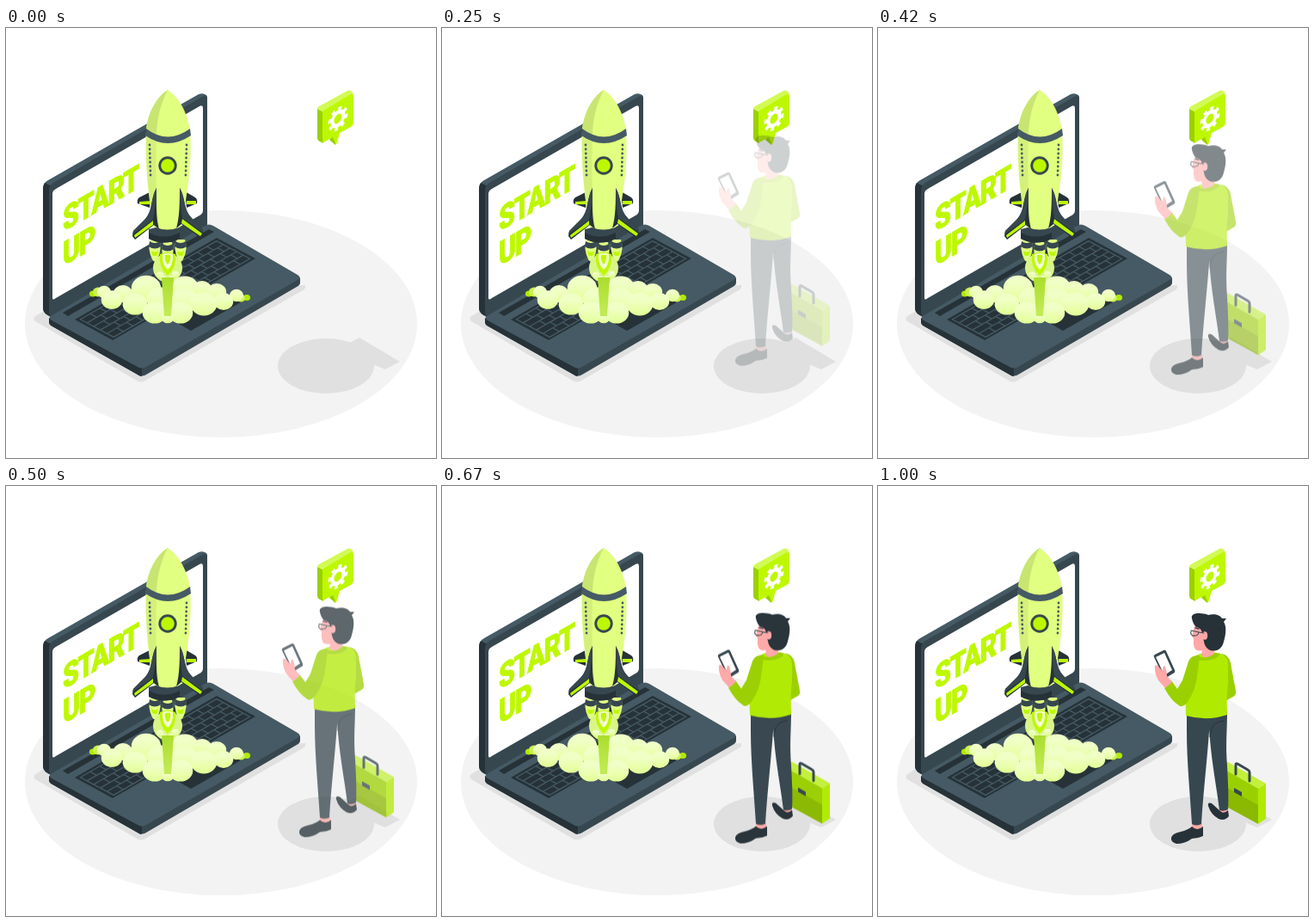
Recreate the animation shown at these times as an HTML page. Size 500 by 500 pixels, loop 1.04 s.

```html
<!DOCTYPE html>
<html lang="en">
<head>
<meta charset="utf-8">
<title>Start up</title>
<style>
  html, body { margin: 0; width: 100%; height: 100%; overflow: hidden; background: #fff; }
  svg { display: block; width: 100vw; height: 100vh; }
  .lime { fill: #b0ea00; }
  .bright { fill: #bdf800; }
  .limeMid { fill: #9bd000; }
  .limeDark { fill: #8bb800; }
  .pale { fill: #e1ff80; }
  .slate { fill: #455a64; }
  .dark { fill: #37474f; }
  .ink { fill: #263238; }
  .skin { fill: #ffa8a7; }
  .line { fill: none; stroke: #37474f; stroke-linejoin: round; stroke-linecap: round; }
  .title { font: 800 39px Roboto, Inter, Arial, sans-serif; letter-spacing: -2px; stroke: #bdf800; stroke-width: .9; }
</style>
</head>
<body>
<svg viewBox="0 0 500 500">
  <defs>
    <linearGradient id="puff" x1="0" y1="0" x2="0" y2="1">
      <stop offset=".3" stop-color="#f0ffc6"/>
      <stop offset="1" stop-color="#e3ff95"/>
    </linearGradient>
    <linearGradient id="plume" x1="0" y1="0" x2="0" y2="1">
      <stop offset="0" stop-color="#aade2c"/>
      <stop offset="1" stop-color="#c3ec58"/>
    </linearGradient>
  </defs>

  <!-- floor and shadows -->
  <ellipse cx="250" cy="344" rx="228" ry="132" fill="#f3f3f3"/>
  <g fill="#e0e0e0">
    <path d="M34 341Q31 338 34 335L60 320L348 299Q349 303 345 305L162 410Q157 413 152 410Z"/>
    <ellipse cx="372" cy="393" rx="56" ry="32"/>
    <path d="M396 368L411 360L458 388L441 397L424 390Z"/>
  </g>

  <!-- laptop screen -->
  <path class="slate" d="M43 326V187Q43 180 49 177L224 77Q229 75 233 78L234 80V231L52 336Q43 332 43 326Z"/>
  <path class="ink" d="M43 326V187Q43 183 45 180L53 184V336Q43 332 43 326Z"/>
  <path class="dark" d="M50 332V189Q50 183 55 180L228 80Q234 77 234 83V231L52 336Z"/>
  <path fill="#fff" d="M54 314V193Q54 189 58 187L225 91Q229 89 229 93V212Q229 216 225 218L58 314Q54 317 54 314Z"/>
  <g class="bright title">
    <text transform="matrix(.78 -.45 0 1 66 237)">START</text>
    <text transform="matrix(.78 -.45 0 1 66 277)">UP</text>
  </g>

  <!-- laptop base -->
  <path class="dark" d="M50 338L158 394L342 290V296Q342 299 338 301L163 403Q158 406 153 403L54 347Q50 345 50 342Z"/>
  <path class="ink" d="M50 337L158 394V405Q155 405 153 403L54 347Q50 345 50 342Z"/>
  <path class="slate" d="M52 335L231 230Q236 227 241 230L339 287Q344 290 339 293L163 394Q158 397 153 394L53 340Q49 337 52 335Z"/>
  <path class="ink" d="M66 331L236 234L242 237L72 335Z"/>
  <path class="ink" d="M80 339L245 244L290 268L124 363Z"/>
  <g id="keys" fill="none" stroke="#455a64" stroke-width="1.3"/>
  <path class="ink" d="M173 328L215 352L273 319L231 295Z"/>

  <!-- rocket -->
  <g>
    <path class="ink" d="M169 190L155 197Q152 199 153 204L167 209ZM208 190L220 197Q223 199 222 204L210 209Z"/>
    <path class="bright" d="M155 202L168 201V205L155 205ZM210 201L221 201V205L210 205Z"/>
    <g id="jets"></g>
    <path class="dark" d="M166 234Q184 228 202 234V245Q184 254 166 245Z"/>
    <path class="ink" d="M166 238Q184 247 202 238V245Q184 254 166 245Z"/>
    <path class="pale" d="M188 72C176 79 164 99 163 120C161 158 166 200 172 231Q188 238 203 231C210 200 217 158 214 120C212 99 200 79 188 72Z"/>
    <path fill="#c8e572" d="M188 72C176 79 164 99 163 120Q168 125 175 127C175 105 180 88 188 72Z"/>
    <path fill="#d4f07a" d="M163 124C162 160 167 202 172 231L178 233C174 198 174 160 175 129Z"/>
    <path class="slate" d="M163 117Q188 136 214 117L215 125Q188 143 162 125Z"/>
    <circle class="dark" cx="188" cy="160" r="10.7"/>
    <circle class="bright" cx="188" cy="160" r="7.8"/>
    <g id="rivets" class="slate"></g>
    <path class="ink" d="M175 186C168 198 171 212 162 222L148 236L147 242L150 246L172 229L178 234C174 220 175 203 175 186Z"/>
    <path class="dark" d="M175 186C168 198 171 212 162 222L148 236L147 240L171 223C173 210 175 200 175 186Z"/>
    <path class="bright" d="M149 241L171 224V229L150 244Z"/>
    <path class="ink" d="M202 186C209 198 206 210 215 220L229 235V240L226 244L204 228L198 233C202 219 202 203 202 186Z"/>
    <path class="dark" d="M202 186C209 198 206 210 215 220L229 235V238L205 221C203 209 202 200 202 186Z"/>
    <path class="bright" d="M205 222L228 239L226 242L204 227Z"/>
  </g>

  <!-- flame and smoke -->
  <circle cx="188" cy="279" r="17" fill="#d9f588"/>
  <g id="smoke"></g>
  <path class="bright" d="M179 263Q188 259 197 263Q199 278 188 288Q177 278 179 263Z"/>
  <path fill="#f5ffd8" d="M182 263Q188 261 194 263Q195 275 188 281Q181 275 182 263Z"/>
  <path class="bright" d="M185 264Q188 263 191 264Q192 271 188 275Q184 271 185 264Z"/>

  <!-- speech bubble -->
  <path class="limeMid" d="M362 94L369 97V134L365 132Q362 131 362 127ZM376 130L379 126L386 123L383 136Z"/>
  <path fill="#d2fa55" d="M362 94Q362 92 364 91L397 73Q399 72 401 73L404 76L369 98Z"/>
  <path class="bright" d="M368 99Q368 96 371 95L401 77Q404 76 404 79V110Q404 113 401 115L388 122L384 136L380 127L371 132Q368 134 368 131Z"/>
  <g transform="matrix(.866 -.5 0 1 386 105.5)" fill="none" stroke="#fff">
    <circle r="7.6" stroke-width="4.6"/>
    <circle r="11" stroke-width="4.6" stroke-dasharray="4.32 4.32"/>
  </g>

  <!-- person and briefcase -->
  <g id="person">
    <path fill="#c3f03c" d="M398 327L407 321L451 346L442 352Z"/>
    <path class="limeDark" d="M398 327L442 352V393L398 369Z"/>
    <path class="limeMid" d="M398 327L442 352V371L398 346Z"/>
    <path class="lime" d="M442 352L451 346V387L442 393Z"/>
    <path class="line" stroke-width="3" d="M416 335V324Q416 322 418 323L430 330Q432 331 432 333V343"/>
    <path class="dark" d="M414 351L423 356V361L414 356Z"/>

    <path class="skin" d="M397 374H406L407 385L398 382ZM365 391L377 392V402L365 400Z"/>
    <path class="ink" d="M384 372Q383 367 388 369L398 378Q402 382 407 377L408 384Q403 390 396 387Q387 382 384 372Z"/>
    <path class="ink" d="M341 409Q342 404 352 402Q360 400 365 396Q371 402 378 396V407Q372 410 365 410Q357 416 347 416Q340 414 341 409Z"/>
    <path class="dark" d="M383 264L406 262C406 285 404 300 406 325C407 345 408 362 407 376Q402 379 397 377C394 350 388 325 385 282Z"/>
    <path class="dark" d="M359 264L406 263Q406 268 404 272C392 274 386 278 385 286C382 325 378 360 376 393Q370 396 365 393C363 360 359 320 359 285Z"/>
    <path fill="none" stroke="#263238" d="M402 273C391 275 387 279 386 292"/>

    <path class="limeMid" d="M399 195Q408 196 410 206L416 238Q417 243 413 245L404 250Z"/>
    <path class="lime" d="M370 197Q384 190 398 195Q406 197 407 207L407 230Q405 240 406 266Q383 274 358 267Q357 245 359 225Q361 207 370 197Z"/>
    <path class="limeMid" d="M374 197Q364 196 361 204L354 226L348 236L341 226L333 235Q341 250 351 256Q356 257 360 251Q369 238 371 222Q373 208 374 197Z"/>

    <path class="dark" d="M321 199Q320 197 322 196L332 191Q334 190 335 192L345 214Q346 217 343 218L335 223Q333 224 332 222Z"/>
    <path fill="#fff" d="M323 199L333 194L342 214L333 220Z"/>
    <path class="skin" d="M322 209Q324 207 326 210L331 215Q331 207 334 210Q336 216 336 221L342 228L334 235L326 226Q321 217 322 209Z"/>

    <path class="skin" d="M378 183H391V197Q382 202 376 197Z"/>
    <path class="limeMid" d="M370 197Q382 203 392 194L398 195Q391 206 370 202Z"/>
    <path class="skin" d="M369 161Q366 168 365 175L367 177Q366 190 371 191Q378 193 384 187L388 166L378 158Z"/>
    <path class="ink" d="M365 154C363 147 376 147 384 150C391 148 398 150 400 154L405 154L402 158C406 164 404 174 402 181C400 190 393 193 386 191Q380 188 379 181L377 171Q376 165 370 164Q366 160 365 154Z"/>
    <ellipse class="skin" cx="380" cy="174" rx="3.2" ry="4.8"/>
    <path class="line" stroke-width="1.1" d="M364 169Q363 173 366 174Q372 175 373 170L364 168M373 170L379 171"/>
    <path class="line" stroke-width="1.3" d="M369 165L373 166"/>
  </g>
</svg>
<script>
  const $ = id => document.getElementById(id);

  function add(parent, tag, attrs) {
    const el = document.createElementNS('http://www.w3.org/2000/svg', tag);
    for (const k in attrs) el.setAttribute(k, attrs[k]);
    parent.append(el);
  }

  // Keyboard grid: u runs along the rows, v across them, inside a thin border.
  const inset = (x, m) => m + x * (1 - 2 * m);
  function at(u, v) {
    u = inset(u, 0.02);
    v = inset(v, 0.07);
    return `${80 + 165 * u + 45 * v} ${339 - 95 * u + 24 * v}`;
  }
  const ROWS = 5, COLS = 14;
  let grid = `M${at(0, 0)}L${at(1, 0)}L${at(1, 1)}L${at(0, 1)}Z`;
  for (let r = 0; r < ROWS; r++) {
    if (r) grid += `M${at(0, r / ROWS)}L${at(1, r / ROWS)}`;
    for (let c = 1; c < COLS; c++) {
      const u = (c + (r % 2) * 0.4) / COLS;
      grid += `M${at(u, r / ROWS)}L${at(u, (r + 1) / ROWS)}`;
    }
  }
  add($('keys'), 'path', { d: grid });

  for (let i = 0; i < 8; i++) {
    const cy = 136 + i * 5;
    add($('rivets'), 'circle', { cx: 167 + i * 0.15, cy, r: 1.4 });
    add($('rivets'), 'circle', { cx: 210 - i * 0.15, cy, r: 1.4 });
  }

  for (const x of [173, 188, 203]) {
    const y = x === 188 ? 3 : 0;
    const jet = (cls, d) => add($('jets'), 'path', { class: cls, d, transform: `translate(${x} ${y})` });
    jet('pale', 'M-5 246H5Q9 256 3 269Q0 274 -3 269Q-9 256 -5 246Z');
    jet('dark', 'M-6 248Q0 252 6 248L7 254Q0 259 -7 254Z');
    jet('bright', 'M-4 259Q0 262 4 259L3 264Q0 266 -3 264Z');
  }

  const GREEN = '#b0ea00', LIGHT = '#c9f24e', PUFF = 'url(#puff)';
  const puffs = [
    [101, 309, 4, GREEN], [107, 307, 6, LIGHT], [280, 313.5, 4, GREEN], [273, 314, 5, LIGHT],
    [114, 307, 8], [136, 309, 11], [123, 316, 12], [268, 311, 8],
    [228, 304, 11], [245, 307, 11], [163, 303, 17], [208, 303, 16],
    [180, 316, 16], [207, 317, 16],
    [150, 321, 14], [253, 318, 11], [230, 321, 15],
    [173, 331, 14], [203, 331, 14], [188, 337, 7],
    [179, 287, 4], [197, 286, 4], [183, 291, 3], [192, 291, 3]
  ];
  for (const [cx, cy, r, fill = PUFF] of puffs) {
    add($('smoke'), 'ellipse', { cx, cy, rx: r * 1.02, ry: r * 0.9, fill });
  }
  add($('smoke'), 'path', { d: 'M181 290H195L192 335H184Z', fill: 'url(#plume)' });

  // The person drops in with a slight overshoot, at 24 steps a second.
  const LOOP = 1040, STEPS = 24;
  const drop = $('person').animate(
    [{ opacity: 0, transform: 'translateY(-30px)' }, { opacity: 1, transform: 'translateY(0px)' }],
    { duration: 1000, easing: 'cubic-bezier(.36,-.01,.5,1.38)', fill: 'both' }
  );
  drop.pause();

  const stepStart = n => Math.round(n * 100 / STEPS) * 10;
  const start = performance.now();

  function draw() {
    const t = (performance.now() - start) % LOOP;
    let n = 0;
    while (n < STEPS && stepStart(n + 1) <= t) n++;
    drop.currentTime = n * 1000 / STEPS;
    requestAnimationFrame(draw);
  }
  draw();
</script>
</body>
</html>
```
